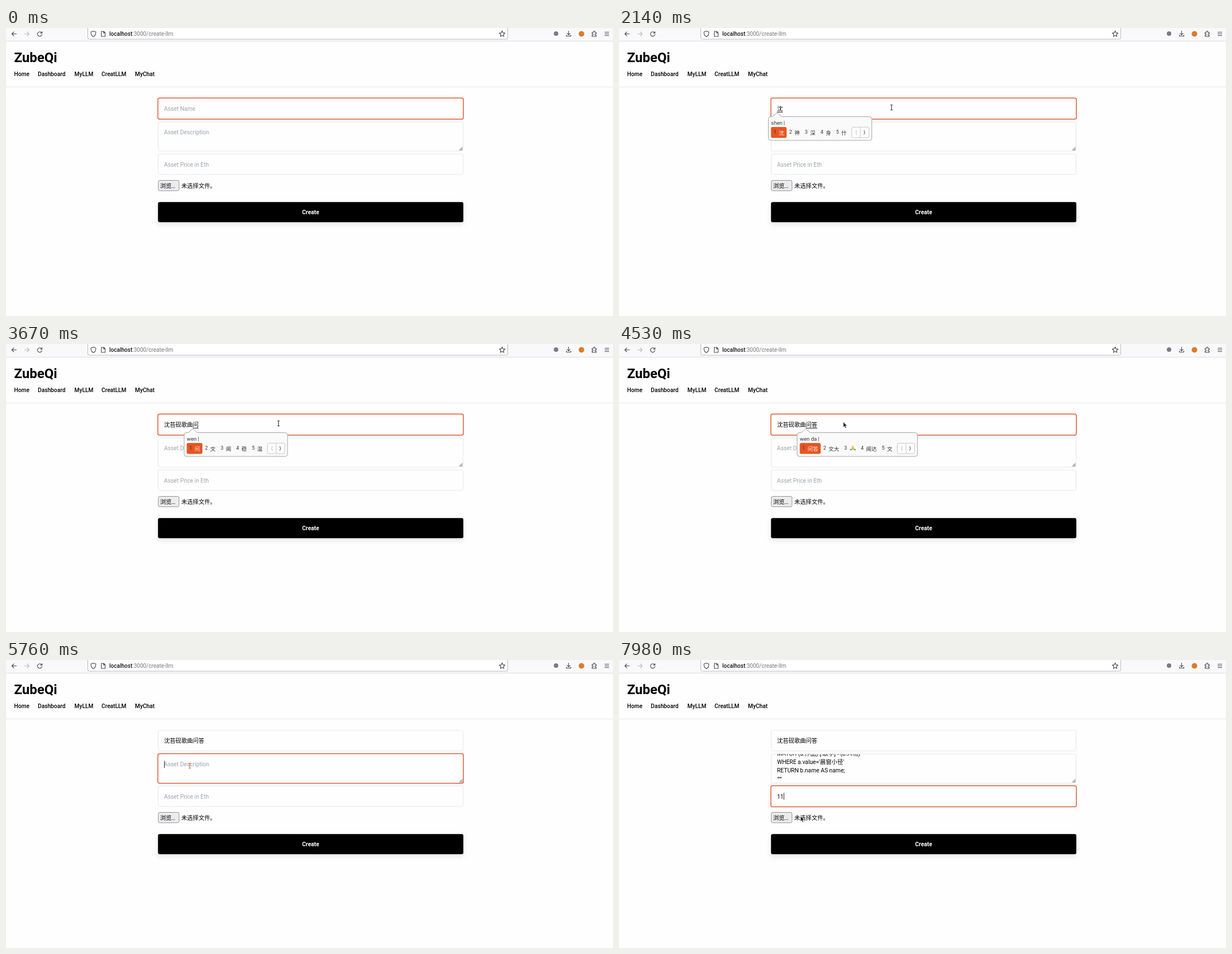
Recreate the animation shown at these times as an HTML page. Size 1087x515 px, loop 8 s.

```html
<!DOCTYPE html>
<html lang="zh">
<head>
<meta charset="utf-8">
<title>Create asset</title>
<style>
  html, body { margin: 0; width: 100%; height: 100%; overflow: hidden; background: #fefefe; }
  svg { display: block; width: 100%; height: 100%; }
  text { font: 10.3px Roboto, "Noto Sans CJK SC", "Noto Sans CJK", sans-serif; white-space: pre; }
  .title { font-size: 24px; font-weight: 700; }
  .nav text { font-size: 10.2px; font-weight: 500; }
  .url { font-size: 10px; fill: #77777f; }
  .host { font-weight: 500; fill: #15141a; }
  .hint { fill: #9ca3af; }
  .ime { font-size: 9.6px; fill: #333; }
  .digit { font-size: 9px; fill: #333; }
  .cand { font-size: 9.5px; fill: #333; }
  .icon { fill: none; stroke: #45454f; stroke-width: 1.1; stroke-linecap: round; stroke-linejoin: round; }
  .field { fill: #fefefe; stroke: #e5e7eb; }
  .focus { fill: #fefefe; stroke: #df5a32; stroke-width: 1.5; }
  .create { filter: drop-shadow(0 4px 5px rgba(0, 0, 0, .1)); }
  .label { fill: #fff; font-weight: 700; text-anchor: middle; }
</style>
</head>
<body>
<svg viewBox="0 0 1087 515">
  <defs>
    <clipPath id="areaClip"><rect x="273" y="168.5" width="545" height="51"/></clipPath>
  </defs>

  <!-- browser toolbar -->
  <rect width="1087" height="23" fill="#f9f9fb"/>
  <path d="M0 23.5H1087" stroke="#dddde0"/>
  <rect x="146.5" y="-3" width="752" height="23" rx="3" fill="#fff" stroke="#b9b9c0"/>
  <g class="icon">
    <path d="M18.5 10.5H10.5M14 7l-3.5 3.5 3.5 3.5"/>
    <path d="M33.5 10.5H41.5M38 7l3.5 3.5-3.5 3.5" stroke="#b9b9bf"/>
    <path d="M63.8 8.6A4 4 0 1 0 64.4 11.5M64.5 6.5V9.2H61.7"/>
    <path d="M156.5 5.5l4.3 1.5c.3 4-1.3 7-4.3 8.5-3-1.5-4.6-4.5-4.3-8.5z"/>
    <path d="M170.7 6h4.3l2.5 2.5v6.5h-6.8zM174.8 6v2.7h2.7"/>
    <path d="M888.5 5.3l1.5 3.3 3.6.4-2.7 2.5.8 3.5-3.2-1.8-3.2 1.8.8-3.5-2.7-2.5 3.6-.4z"/>
    <path d="M1007.5 5.5V12M1004.8 9.6l2.7 2.7 2.7-2.7M1003.5 12.5v2h8v-2"/>
    <path d="M1049.5 8h2.4c-.8-3.2 3.6-3.2 2.8 0h2.3v2.5c-3-.8-3 3.2 0 2.5V15h-7.5v-2.2c2.7.4 2.7-2.8 0-2.4z"/>
    <path d="M1072.5 7.5h7M1072.5 10.5h7M1072.5 13.5h7"/>
  </g>
  <circle cx="985" cy="10" r="4" fill="#7a7a83"/>
  <circle cx="1030.5" cy="10.5" r="5" fill="#dd7a2c"/>
  <text class="url" x="185" y="14"><tspan class="host">localhost</tspan>:3000/create-llm</text>

  <!-- page header -->
  <text class="title" x="14.5" y="60.5">ZubeQi</text>
  <g class="nav">
    <text x="14.5" y="86">Home</text>
    <text x="57" y="86">Dashboard</text>
    <text x="122.5" y="86">MyLLM</text>
    <text x="171" y="86">CreatLLM</text>
    <text x="231" y="86">MyChat</text>
  </g>
  <path d="M0 105.5H1087" stroke="#e5e7eb"/>

  <g id="form"></g>

  <rect x="272.8" y="272.5" width="37" height="18.5" rx="2.5" fill="#ececec" stroke="#8f8f9d"/>
  <text x="276" y="286">浏览…</text>
  <text x="314" y="286">未选择文件。</text>
  <rect class="create" x="272.2" y="311.3" width="546.8" height="36" rx="3"/>
  <text class="label" x="545.5" y="333">Create</text>

  <g id="popup"></g>
  <g id="mouse"></g>
</svg>
<script>
const LOOP = 8000, LEFT = 283, GLYPH = 10.3;
const NAME = '沈苔砚', TOPIC = NAME + '歌曲', FULL = TOPIC + '问答';
const form = document.getElementById('form');
const popup = document.getElementById('popup');
const mouse = document.getElementById('mouse');

// [time, committed text, pinyin, candidates, caret]
const typing = [
  [0, '', '', '', 0],
  [960, '', '', '', 1],
  [1710, '', 's', '是 上 说 时 三', 0],
  [1790, '', 'sh', '是 上 说 时 使', 0],
  [1930, '', 'she', '设 社 射 舍 蛇', 0],
  [2050, '', 'shen', '沈 神 深 身 什', 0],
  [2260, '', 'shen t', '身体 神态 深谈 神通 深潭', 0],
  [2340, '', 'shen ta', '神塔 深塔 身他 沈塔 神他', 0],
  [2410, '', 'shen tai', '神态 身态 深台 沈苔 神台', 0],
  [2540, '', 'shen tai y', '沈苔砚 神态语 神态 身体 沈苔', 0],
  [2600, '', 'shen tai yan', '沈苔砚 神态言 神态 身态 沈苔', 0],
  [2650, NAME, '', '', 1],
  [2820, NAME, 'g', '个 过 给 该 高', 1],
  [2900, NAME, 'ge', '个 歌 各 格 哥', 1],
  [3100, NAME, 'ge q', '歌曲 个区 各区 搁浅 割取', 1],
  [3230, NAME, 'ge qu', '歌曲 个区 各区 割取 格区', 1],
  [3340, TOPIC, '', '', 1],
  [3500, TOPIC, 'w', '我 我们 为 为什么 无', 0],
  [3590, TOPIC, 'we', '为 我们 位 为什么 未', 0],
  [3670, TOPIC, 'wen', '问 文 闻 稳 温', 0],
  [3870, TOPIC, 'wen d', '稳定 问道 文档 温度 问答', 0],
  [4090, TOPIC, 'wen da', '问答 文大 * 闻达 文', 0],
  [5500, FULL, '', '', 1],
  [5760, FULL, '', '', 0]
];

// [time, x, y]: centre of the text beam or tip of the arrow
const path = [
  [190, 914, 488], [400, 760, 395], [620, 602, 270], [820, 513, 196],
  [900, 494, 163], [980, 488, 142], [3870, 488, 142], [4090, 490, 102],
  [4370, 490, 102], [4440, 486, 28], [4530, 402, 139], [4780, 316, 194],
  [5150, 322, 190], [5200, 322, 190], [5230, 325, 188], [5759, 325, 188],
  [5760, 329, 189], [6180, 329, 189], [6340, 341, 231], [6579, 341, 231],
  [6580, 340, 239], [7810, 340, 239], [7980, 325, 279], [LOOP, 325, 279]
];

const query = ['MATCH (a:作品)-[:歌手]-&gt;(b:人物)', "WHERE a.value='晨窗小径'", 'RETURN b.name AS name;', '"""'];

const text = (x, y, str, attrs = '') => `<text x="${x}" y="${y}" ${attrs}>${str}</text>`;
const caret = (x, y) => `<path d="M${x} ${y}v12.5" stroke="#222"/>`;
const itemWidth = word => word === '*' ? 29.7 : 18.5 + 9.5 * word.length;

// The focus ring sits slightly outside the resting border.
function box(y, h, focused) {
  const grow = focused ? .5 : 0;
  return `<rect class="${focused ? 'focus' : 'field'}" x="${272.5 - grow}" y="${y - grow}" width="${546 + 2 * grow}" height="${h + 2 * grow}" rx="3"/>`;
}

function drawForm(t, [, done, , words, showCaret]) {
  const preview = words.split(' ')[0];
  const name = done + preview;
  const nameEnd = LEFT + name.length * GLYPH;
  const focus = t < 5760 ? 0 : t < 6910 ? 1 : 2;
  const pasted = t >= 6180;
  const price = t < 7320 ? '' : t < 7860 ? '1' : '11';

  let out = box(125.8, 36.8, focus === 0) + box(168, 52, focus === 1) + box(225.2, 36.8, focus === 2);
  out += name ? text(LEFT, 148, name) : text(LEFT, 148, 'Asset Name', 'class="hint"');
  if (preview) out += `<path d="M${LEFT + done.length * GLYPH} 150.5H${nameEnd}" stroke="#222"/>`;
  if (showCaret) out += caret(nameEnd + .7, 138.5);

  out += pasted
    ? `<g clip-path="url(#areaClip)">${query.map((line, i) => text(LEFT, 171 + i * 15.2, line)).join('')}</g>`
    : text(LEFT, 190, 'Asset Description', 'class="hint"');
  if (focus === 1) out += pasted ? caret(296.5, 207) : caret(283.7, 180.5);
  out += '<path d="M817.5 212v7h-7z" fill="#b4b4b8"/>';

  out += price ? text(LEFT, 247.5, price) : text(LEFT, 247.5, 'Asset Price in Eth', 'class="hint"');
  if (focus === 2) out += caret(LEFT + .7 + price.length * 5.8, 237.5);
  form.innerHTML = out;
}

function drawPopup([, done, pinyin, list]) {
  if (!pinyin) { popup.innerHTML = ''; return; }
  const tip = LEFT + done.length * GLYPH;
  const left = tip - 15.5;
  let x = left + 4.7, items = '';
  list.split(' ').forEach((word, i) => {
    const width = itemWidth(word);
    if (!i) items += `<rect x="${x}" y="177" width="${width}" height="19.5" rx="3" fill="#e95420"/>`;
    items += text(x + 4.5, 188.5, i + 1, 'class="digit"');
    items += word === '*'
      ? `<g transform="translate(${x + 14.5} 180.5)"><path d="M5.5 0L7.5 5.5 9 8 5.5 9 2 8 3.5 5.5z" fill="#f5b82e"/><path d="M1.5 6.5L4 9.5H0zM9.5 6.5L11 9.5H7z" fill="#4a90c8"/></g>`
      : text(x + 14, 190.5, word, `class="cand" ${i ? '' : 'style="fill:#fff"'}`);
    x += width;
  });
  const nav = x + 4.5, right = nav + 36;
  popup.innerHTML =
    `<path d="M${left + 4} 158.5H${tip - 8}L${tip} 151.5L${tip + 8} 158.5H${right - 4}q4 0 4 4V197q0 4-4 4H${left + 4}q-4 0-4-4V162.5q0-4 4-4z" fill="#fafafa" stroke="#a5a5a5"/>` +
    text(left + 4.7, 172.5, pinyin + '\u2009|', 'class="ime"') + items +
    `<rect x="${nav}" y="177.3" width="31" height="18.8" rx="2.5" fill="#fcfcfc" stroke="#c8c8c8"/>` +
    `<path d="M${nav + 15.5} 177.3v18.8" stroke="#c8c8c8"/>` +
    `<path d="M${nav + 9} 183q-3 3.7 0 7.5" fill="none" stroke="#bbb"/>` +
    `<path d="M${nav + 22} 183q3 3.7 0 7.5" fill="none" stroke="#444"/>`;
}

function drawMouse(t) {
  if (t < path[0][0]) { mouse.innerHTML = ''; return; }
  const next = path.findIndex(p => p[0] > t);
  const [t0, x0, y0] = path[next - 1], [t1, x1, y1] = path[next];
  const k = (t - t0) / (t1 - t0);
  const x = x0 + (x1 - x0) * k, y = y0 + (y1 - y0) * k;
  const overPopup = t >= 4370 && t < 5760;
  const overField = x > 273 && x < 819 && [[126, 162], [168, 220], [225, 262]].some(([a, b]) => y >= a && y <= b);
  const color = t >= 5760 && t < 6180 ? '#dc6a50' : '#333';
  mouse.innerHTML = overField && !overPopup
    ? `<path d="M${x - 2} ${y - 4.5}h4M${x} ${y - 4.5}v9M${x - 2} ${y + 4.5}h4" fill="none" stroke="${color}" stroke-width="1.2"/>`
    : `<path transform="translate(${x} ${y})" d="M0 0V9.8L2.2 7.8 3.8 11.5 5.5 10.7 4 7.2H7z" fill="#222" stroke="#fff" stroke-width=".7"/>`;
}

function frame(now) {
  const t = now % LOOP;
  const state = typing.filter(s => s[0] <= t).pop();
  drawForm(t, state);
  drawPopup(state);
  drawMouse(t);
  requestAnimationFrame(() => frame(performance.now() - start));
}

const start = performance.now();
frame(0);
</script>
</body>
</html>
```
